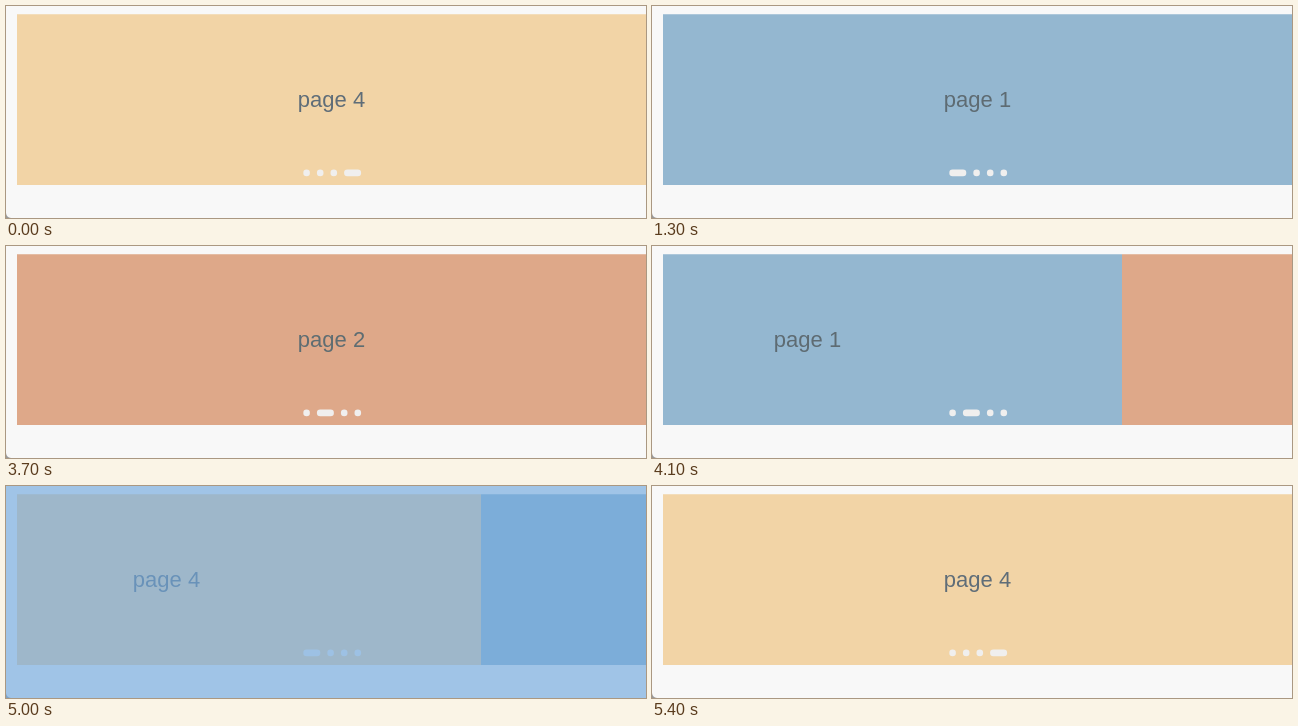
Recreate the animation shown at these times as an HTML page. Size 640 px wide and 212 px high, loop 6700 ms.

```html
<!DOCTYPE html>
<html lang="en">
<head>
<meta charset="utf-8">
<title>Carousel</title>
<style>
  html, body { margin: 0; width: 100%; height: 100%; overflow: hidden; background: #f8f8f8; }
  svg { display: block; }
  text { font: 22px "Liberation Sans", Arial, sans-serif; text-anchor: middle; }
</style>
</head>
<body>
<svg width="640" height="212" viewBox="0 0 640 212">
  <clipPath id="view"><rect x="11" y="8.25" width="629" height="170.75"/></clipPath>
  <path d="M0 207Q.5 211.5 5 212H0Z" fill="#999"/>
  <g id="pages" clip-path="url(#view)"></g>
  <g id="dots" fill="#f0efee"></g>
  <rect id="highlight" width="640" height="212" fill="rgb(111,168,223)" fill-opacity=".64"/>
</svg>
<script>
const LOOP = 6700, STEP = 100, SLIDE = 300, WIDTH = 629;
const DOT = 6.6, PILL = 17, GAP = 7;
const $ = id => document.getElementById(id);
const clamp = v => Math.max(0, Math.min(1, v));

// Lead: how far into the slide its first visible step is, in ms.
const moves = [
  { start: 900, from: 4, to: 1, dir: 1, lead: 30.7 },
  { start: 3300, from: 1, to: 2, dir: 1, lead: 30.7 },
  { start: 4000, from: 2, to: 1, dir: -1, lead: 30.7 },
  { start: 4900, from: 1, to: 4, dir: -1, lead: 32.5 },
];
const styles = {
  1: ["#94b7d0", "#5e6b72"],
  2: ["#dea889", "#5e6d72"],
  4: ["#f2d4a6", "#5f6d78"],
};

function add(parent, tag, attrs) {
  const el = document.createElementNS("http://www.w3.org/2000/svg", tag);
  for (const name in attrs) el.setAttribute(name, attrs[name]);
  return parent.appendChild(el);
}

const pages = {};
for (const n in styles) {
  const [fill, ink] = styles[n];
  const page = pages[n] = add($("pages"), "g", {});
  add(page, "rect", { x: 11, width: WIDTH, height: 212, fill });
  add(page, "text", { x: 325.5, y: 101, fill: ink }).textContent = "page " + n;
}
const dots = [1, 2, 3, 4].map(() =>
  add($("dots"), "rect", { y: 163.6, height: DOT, rx: DOT / 2 }));

// cubic-bezier(.25, .1, .25, 1)
function ease(x) {
  let lo = 0, hi = 1;
  for (let i = 0; i < 24; i++) {
    const s = (lo + hi) / 2;
    if (.75 * s * (1 - s) + s ** 3 < x) lo = s; else hi = s;
  }
  return .3 * lo * (1 - lo) ** 2 + 3 * lo ** 2 * (1 - lo) + lo ** 3;
}

function place(n, x) {
  pages[n].setAttribute("visibility", Math.abs(x) < WIDTH ? "visible" : "hidden");
  pages[n].setAttribute("transform", `translate(${x})`);
}

function draw(now) {
  const t = Math.floor(now % LOOP / STEP) * STEP;
  const move = moves.filter(m => m.start <= t).pop() || moves[moves.length - 1];
  const age = (t - move.start + LOOP) % LOOP + move.lead;

  // Whole pixels keep the seam between two pages sharp.
  const shift = Math.round(WIDTH * ease(clamp(age / SLIDE)));
  for (const n in pages) place(n, WIDTH);
  place(move.from, -move.dir * shift);
  place(move.to, move.dir * (WIDTH - shift));

  // The indicator follows once the slide has ended.
  const swap = clamp((age - SLIDE) / 100);
  let x = 297.3;
  dots.forEach((dot, i) => {
    const active = i + 1 === move.to ? swap : i + 1 === move.from ? 1 - swap : 0;
    const width = DOT + (PILL - DOT) * active;
    dot.setAttribute("x", x);
    dot.setAttribute("width", width);
    x += width + GAP;
  });

  $("highlight").setAttribute("visibility", t >= 5000 && t < 5200 ? "visible" : "hidden");
}

const begin = performance.now();
function tick() {
  draw(performance.now() - begin);
  requestAnimationFrame(tick);
}
tick();
</script>
</body>
</html>
```
